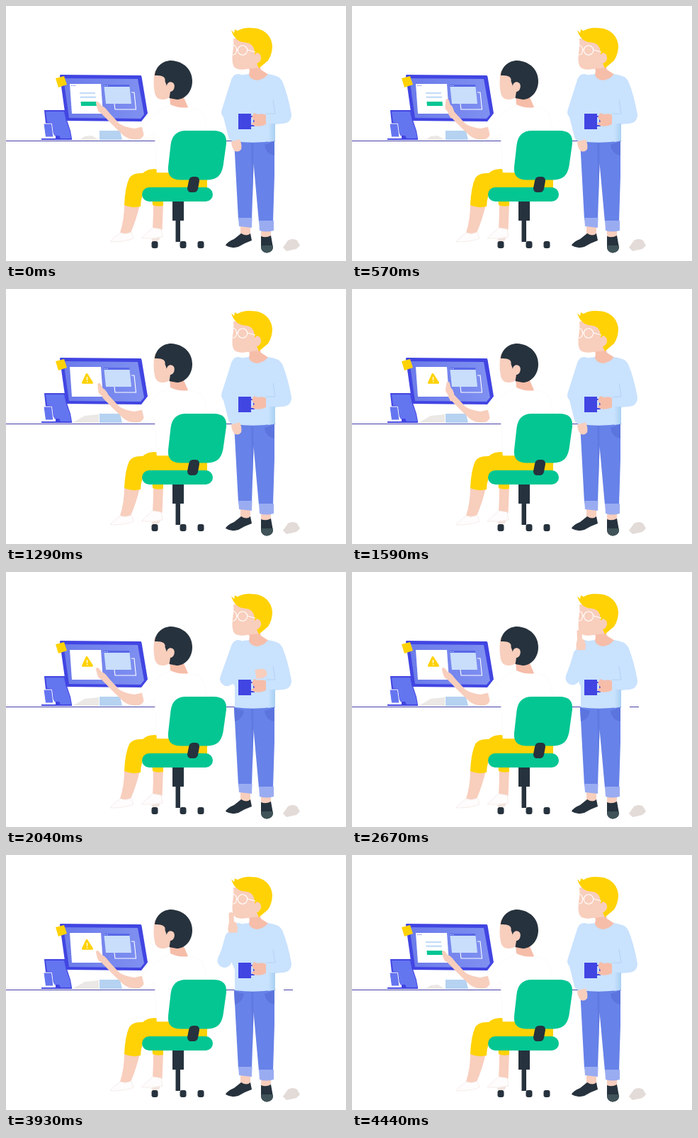
An HTML page for the animation above (4.5 s loop, 480 by 360 pixels).

```html
<!DOCTYPE html>
<html lang="en">
<head>
<meta charset="utf-8">
<title>Two people at a desk</title>
<style>
  html, body { margin: 0; width: 100%; height: 100%; overflow: hidden; background: #fff; }
  svg { display: block; width: 100vw; height: 100vh; }
  .skin { fill: #f8cebd; }
  .neck { fill: #f6bda9; }
  .dark { fill: #26323d; }
  .blue { fill: #4145e2; }
  .mid { fill: #6475f0; }
  .yellow { fill: #ffd206; }
  .green { fill: #03c693; }
  .knit { fill: #c9e2fe; }
  .jeans { fill: #6782e8; }
  .cuff { fill: #9aacf1; }
  .shade { fill: #5b74de; }
  .white { fill: #fff; }
  .faint { fill: #fff; stroke: #fbf6f5; stroke-width: .6; }
  .shoe { fill: #fefcfc; stroke: #f4e9e5; stroke-width: .8; }
  .line { fill: none; stroke: #fff; stroke-width: 1.1; }
  .sleeve { fill: none; stroke: #c9e2fe; stroke-linecap: round; stroke-linejoin: round; }
</style>
</head>
<body>
<svg viewBox="0 0 480 360" xmlns="http://www.w3.org/2000/svg">
  <defs>
    <linearGradient id="glass">
      <stop offset="0" stop-color="#6b7bea"/>
      <stop offset="1" stop-color="#7f90f1"/>
    </linearGradient>
    <linearGradient id="side">
      <stop offset="0" stop-color="#c9e2fe"/>
      <stop offset="1" stop-color="#a9d0f2"/>
    </linearGradient>
  </defs>

  <g id="desk">
    <path id="edge" stroke="#4541a8" stroke-width="1"/>
    <path id="paper" fill="#ebe8e5"/>
    <path fill="#b5d2f1" d="M132 176H161L164 189H132Z"/>
    <path class="blue" d="M54 147H83L86 161L91 176L93 187V189H50V187H70V184L56 166Z"/>
    <path class="mid" d="M56 149H82L85 162L90 176L92 187H77L75 183H68L65 165L58 164Z"/>
    <path class="mid" stroke="#fff" stroke-width="1" d="M53 166H64.500L67 185H55.500Z"/>
  </g>

  <g id="monitor">
    <path class="blue" d="M77 97L190 98Q191 98 191.500 100L200 151.500L191 163L86 162Q85 162 84.500 160L76 99Q76 97 77 97Z"/>
    <path fill="url(#glass)" d="M81 102L186 103L195 153L190 159L89 158Z"/>
    <path class="white" d="M90 110H134L137 152H93Z"/>
    <path fill="#5868e6" d="M138 111H174L174.500 114H138.500Z"/>
    <path fill="#c9defb" d="M138.500 114H174.500L177 138H141Z"/>
    <path fill="none" stroke="#c9defb" stroke-width="1" stroke-dasharray="1.500 1.500" d="M139 112.500H145"/>
    <path class="line" d="M177 122H181L183.500 146H154L153 138"/>
    <g id="form">
      <path stroke="#5968df" stroke-width="1.200" stroke-dasharray="1.200 1.200" d="M92 112.500H98"/>
      <path stroke="#c7def8" stroke-width="2.600" d="M104 123H126M104.500 128.800H127"/>
      <path class="green" d="M105.500 135H127.500L128 141H106Z"/>
    </g>
    <g id="alert">
      <path class="yellow" stroke="#ffd206" stroke-width="3" stroke-linejoin="round" d="M114 120.500L108.500 132.300L121.500 132.300Z"/>
      <path stroke="#fff" stroke-width="1.300" d="M114.500 124V128.700M114.700 130V131.500"/>
    </g>
    <path class="yellow" d="M70 102L82 99L86 111L74 115Z"/>
  </g>

  <g id="sitter">
    <path class="skin" d="M167 280H189Q184 302 176 320L165 323L161 320Q167 302 167 280ZM208 279H222L220.500 316H207Q208 299 208 279Z"/>
    <path fill="#f2e4df" d="M205 329L218 326L216 331L207 333Z"/>
    <path class="shoe" d="M147 333Q150 328 162 320Q169 323 177 319L180 328Q170 333 147 333ZM191 328Q198 321 207 313L219 315L221 326Q206 329 191 328Z"/>
    <path class="yellow" d="M167 281Q168 256 174 243Q179 235 193 236Q199 230 210 230Q245 236 284 244V262L222 266V282Q213 284 207 281L206 268L193 266Q190 275 190 283Q177 286 167 281Z"/>
    <path class="skin" d="M195 170L181 173Q167 171 160 166L144 149L136 153Q149 167 165 182Q174 190 188 188Q194 186 196 178Z"/>
    <path id="point" class="skin" d="M143 159L134 151Q130 150 129 145L126.800 137Q128 133.500 131 136L135 141Q139 142 142 146L148 154Z"/>
    <path class="faint" d="M213 150Q222 143 232 140L257 143Q270 145 276 149Q281 158 284 178V235H213L210 180L196 187L192 170Z"/>
    <path class="neck" d="M231 126L251 129L257 143Q245 145 232 139Z"/>
    <path class="skin" d="M210 92Q207 108 210 123Q212 132 221 132Q228 132 234 127L240 108L230 88Z"/>
    <path class="dark" d="M210 98C211 86 221 77 233 77C252 78 263 91 263 106C263 122 252 132 241 132L230.500 130L232 121C238 121 240 110 235 108C231 106 227 109 227 113L224.500 106Q226 97 210 98Z"/>
    <path class="dark" d="M235 274H251V303H246V333H239.500V303H235Z"/>
    <rect class="green" x="192" y="256" width="100" height="20" rx="10"/>
    <path class="green" d="M254 176H293C306 176 312 182 311 194L306.500 226C304 239 298 245 285 245.500H245C233 245 228 239 229 227L232.500 196C234 183 241 176 254 176Z"/>
    <path class="dark" d="M264 241H268Q273 241 273 247L271 258Q270 263 265 263H260Q256 262 256 257L258 247Q259 241 264 241Z"/>
    <g id="wheels" class="dark"></g>
  </g>

  <g id="stander">
    <path class="skin" d="M331 311H345V324H331ZM360 316H374V328H360Z"/>
    <path class="dark" d="M310 338Q312 333 322 329L332 321Q340 326 345 321L347 331Q338 334 328 340Q318 343 310 338ZM360 325Q367 328 374 324L377 341Q376 348 368 348.500Q361 348 360 341Z"/>
    <path fill="#3f5358" d="M361 338H376.500L377 341Q376 348 368 348.500Q361 348 360 341Z"/>
    <path class="jeans" d="M322 190H379V240L377 305H357L349.500 222L347 302H328Z"/>
    <path class="shade" opacity=".55" d="M346 192H349.500V228L348 270Z"/>
    <path class="shade" d="M379 191V211Q367 209 365 196Z"/>
    <path id="pocket" class="shade" d="M322 192L323 211Q334 208 336 196Z"/>
    <path class="cuff" d="M328 299H347.500L347 313L329 311ZM357 303H378V317Q367 320 358 317Z"/>
    <path class="neck" d="M342 84H358L360 90L371 97Q363 107 354 106Q345 105 342 100L344 92Z"/>
    <path class="knit" d="M343 96Q343 103 354 105Q364 104 370 96Q386 98 390 106Q398 125 403 153Q403 165 391 166L380 167V190Q352 195 323 191V162L318 150L320 104Q326 97 343 96Z"/>
    <path fill="url(#side)" d="M370 166H380V190.500L370 192Z"/>
    <path fill="none" stroke="#b2d4f3" stroke-width="1" d="M377 133L380 152L367 152"/>
    <path class="skin" d="M321 46Q322 55 320 66Q318 82 323 87Q329 91 340 89L358 87L361 66L348 44Z"/>
    <path class="yellow" d="M318 34L322 38L323 33L327 35Q336 30 347 31C364 31 375 42 376 56Q376 68 370 77L357 88L354 81C361 80 363 67 354 66L351.500 69L350 60Q347 52 338 51.500Q323 51 318 34Z"/>
    <path class="line" d="M341 62L352 65M327.500 62H325M320 55Q326 56 325.500 63Q325 69 320 69"/>
    <circle class="line" cx="334" cy="62.500" r="6.700"/>
    <path id="upper" class="sleeve" stroke-width="20"/>
    <path id="fore" class="sleeve" stroke-width="17"/>
    <g id="hand" class="skin">
      <path d="M-2 -6Q5 -8 12 -5Q16 0 12 5Q5 8 -2 6Z"/>
      <path id="finger" d="M4 -5H25Q29 -2 25 2H4Z"/>
    </g>
    <path class="blue" d="M328 152H346V174H328Z"/>
    <path fill="none" stroke="#4145e2" stroke-width="2" d="M345 156H350V169H345"/>
    <path class="neck" d="M347 157L350 151L356 153Q363 151 367 154V167Q360 171 350 169L346 166L351 163Z"/>
  </g>
  <path fill="#e3dbd8" d="M391 341L398 331Q405 327 411 331L415 338L410 343L396 346Z"/>
</svg>

<script>
const LOOP = 4500, STEP = 30;
const $ = id => document.getElementById(id);
const set = (id, name, value) => $(id).setAttribute(name, value);

// rows of [time, value]
const tracks = {
  lift: [[0, 0], [480, 0], [600, 25], [780, 0], [1080, 0], [1560, 25], [1620, 25], [1980, 0]],
  alert: [[0, 0], [620, 0], [740, 1], [4170, 1], [4290, 0]],
  angle: [[0, 76], [1620, 76], [2040, -9], [2460, -74], [3960, -74], [4200, -9], [4410, 76]],
  wrist: [[0, 0], [2040, 0], [2460, -18], [3960, -18], [4200, 0]],
  elbowX: [[0, 314], [1620, 314], [2040, 312], [2670, 311.5], [3300, 309.5], [3930, 308.5], [4410, 314]],
  elbowY: [[0, 150], [1620, 150], [2040, 151], [2670, 149.5], [3930, 149], [4410, 150]],
  finger: [[0, 0], [2040, 0], [2400, 1], [3960, 1], [4170, 0]]
};

function at(name, t) {
  const rows = tracks[name];
  const i = rows.findIndex(r => r[0] > t);
  if (i < 0) return rows[rows.length - 1][1];
  const [t0, a] = rows[i - 1], [t1, b] = rows[i];
  const p = (t - t0) / (t1 - t0);
  return a + (b - a) * p * p * (3 - 2 * p);
}

$("wheels").innerHTML = [210, 250, 275].map(x =>
  `<rect x="${x - 4.5}" y="332" width="9" height="10" rx="3"/>`).join("");

function draw(t) {
  const alert = at("alert", t), angle = at("angle", t);
  const x = at("elbowX", t), y = at("elbowY", t);
  const rad = angle * Math.PI / 180, raised = angle < -30;
  const along = d => `${x + d * Math.cos(rad)} ${y + d * Math.sin(rad)}`;

  set("point", "transform", `rotate(${at("lift", t)} 142 150)`);
  set("form", "opacity", 1 - alert);
  set("alert", "opacity", alert);
  set("paper", "d", alert > .5
    ? "M94 189L111 179L131 177V189Z"
    : "M104 189L111 184L121 183L131 189Z");
  set("edge", "d", "M0 190.5H380" + (raised ? "M392 190.5H405" : ""));

  set("upper", "d", `M328 106L${x} ${y}`);
  set("fore", "d", `M${x} ${y}L${along(34)}`);
  set("hand", "transform", `translate(${along(43)}) rotate(${angle + at("wrist", t)})`);
  set("finger", "transform", `scale(${.4 + .6 * at("finger", t)} 1)`);
  set("pocket", "opacity", angle < 30 ? 1 : 0);
}

const start = performance.now();
function tick() {
  const t = (performance.now() - start) % LOOP;
  draw(Math.floor(t / STEP) * STEP);
  requestAnimationFrame(tick);
}
tick();
</script>
</body>
</html>
```
